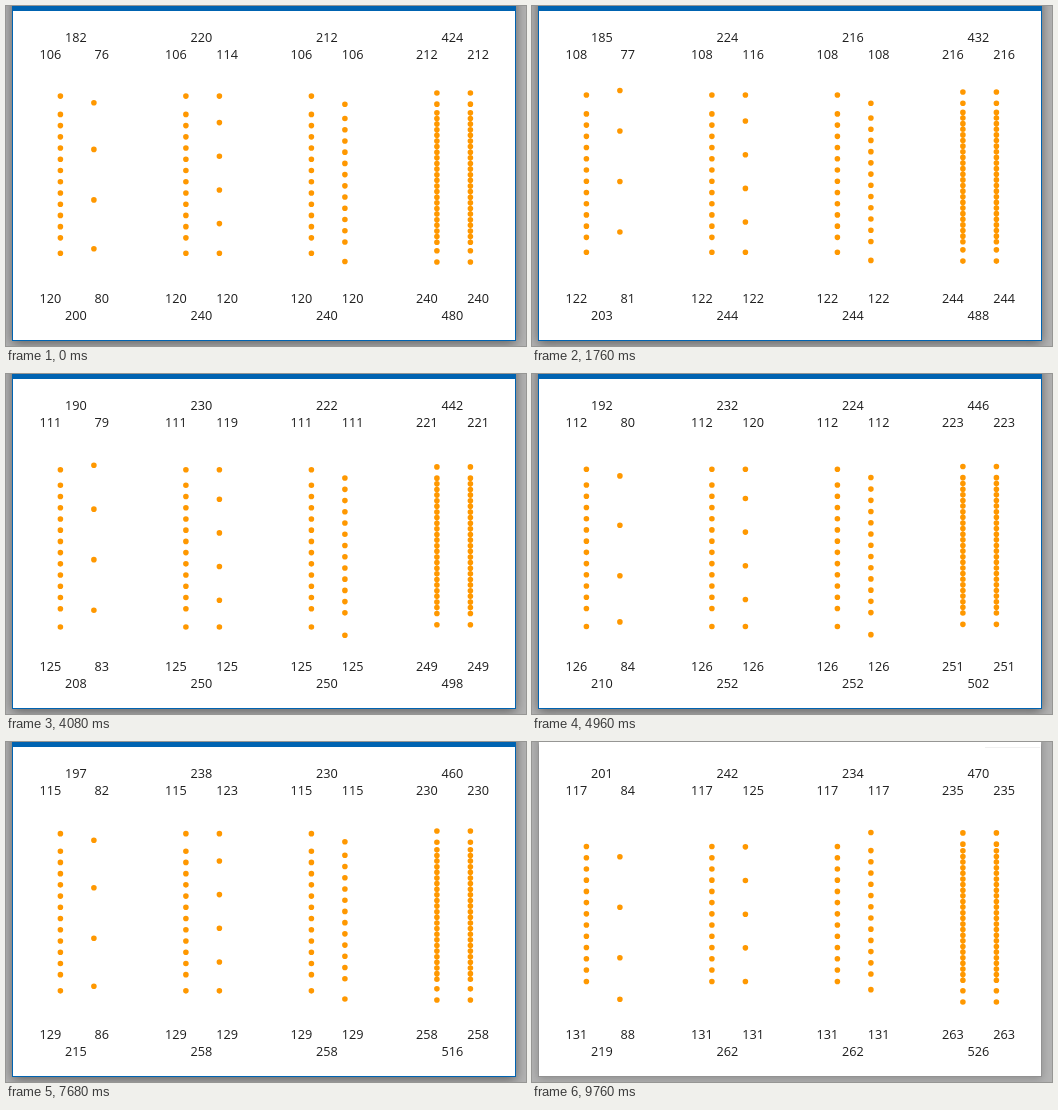
These frames come from a looping animation (520x340 px, 9840 ms). An HTML page:

```html
<!DOCTYPE html>
<html lang="en">
<head>
<meta charset="utf-8">
<title>Throughput and latency</title>
<style>
  html, body { margin: 0; width: 100%; height: 100%; overflow: hidden; background: #b3b3b3; }
  #stage { position: relative; width: 520px; height: 340px; overflow: hidden; }
  #window {
    position: absolute; left: 6px; top: -20px; width: 504px; height: 355px;
    box-sizing: border-box; background: #fff;
    border: 1px solid #0063b1; border-top: 25px solid #0063b1;
    box-shadow: 0 3px 11px rgba(0, 0, 0, .45);
  }
  #window.idle { border-color: #fff #929292 #929292; box-shadow: 0 2px 9px rgba(0, 0, 0, .22); }
  #edge { position: absolute; left: 453px; top: 5px; width: 55px; height: 1px; background: #efefef; display: none; }
  .idle + #edge { display: block; }
  svg { position: absolute; left: 0; top: 0; }
  text { font: 12.7px "Open Sans", "Noto Sans", sans-serif; fill: #1e1e1e; text-anchor: middle; }
  path { stroke: #ff9800; stroke-width: 5.6; stroke-linecap: round; fill: none; }
</style>
</head>
<body>
<div id="stage">
  <div id="window"></div>
  <div id="edge"></div>
  <svg id="view" width="520" height="340" viewBox="0 0 520 340"></svg>
</div>
<script>
const LOOP = 9840, STEP = 80, IDLE_AT = 9680;
const UNIT = 860;
const BOTTOM = 261.5, LOW = 239, HIGH = 104.3, RAMP = 22.4;
const GROUP_GAP = 125.5;

// gap: ms between dots, cross: units spent in the middle section
const slow = { gap: UNIT, phase: 546, cross: 12, sent: 120, flying: 14 };
const late = { ...slow, phase: 232 };
const quick = { ...slow, cross: 4, flying: 6 };
const sparse = { gap: 1.5 * UNIT, phase: 722, cross: 4, sent: 80, flying: 4 };
const dense = { gap: 431, phase: 210, cross: 12, sent: 240, flying: 28 };
const pairs = [[slow, sparse], [slow, quick], [slow, late], [dense, dense]];

const view = document.getElementById('view');
const frame = document.getElementById('window');

function add(tag, attrs = {}) {
  const el = document.createElementNS('http://www.w3.org/2000/svg', tag);
  for (const key in attrs) el.setAttribute(key, attrs[key]);
  return view.appendChild(el);
}

const label = (x, y) => add('text', { x, y });

const groups = pairs.map((pair, i) => {
  const left = i * GROUP_GAP;
  return {
    received: label(left + 70, 35.8),
    sent: label(left + 70, 314),
    lanes: pair.map((flow, j) => ({
      flow,
      x: left + 54.4 + j * 33.5,
      dots: add('path'),
      received: label(left + 44.5 + j * 51.2, 53.4),
      sent: label(left + 44.5 + j * 51.2, 296.6)
    }))
  };
});

// Ramp in, cross the middle, ramp out
function height(age, cross) {
  const u = age / UNIT;
  if (u < 1) return BOTTOM - u * RAMP;
  if (u < 1 + cross) return LOW - (u - 1) / cross * (LOW - HIGH);
  return HIGH - (u - 1 - cross) * RAMP;
}

function drawLane({ flow, x, dots, received, sent }, t) {
  const { gap, phase, cross } = flow;
  const clock = t + phase;
  const end = (cross + 2) * UNIT - 30;
  let d = '';
  for (let age = clock % gap; age < end; age += gap) {
    d += `M${x} ${height(age, cross).toFixed(2)}h0`;
  }
  dots.setAttribute('d', d);
  const out = flow.sent + Math.floor(clock / gap);
  const back = out - flow.flying;
  sent.textContent = out;
  received.textContent = back;
  return [back, out];
}

function draw(t) {
  for (const { received, sent, lanes } of groups) {
    const [a, b] = lanes.map(lane => drawLane(lane, t));
    received.textContent = a[0] + b[0];
    sent.textContent = a[1] + b[1];
  }
  frame.classList.toggle('idle', t >= IDLE_AT);
}

const start = performance.now();
function tick() {
  const t = (performance.now() - start) % LOOP;
  draw(Math.floor(t / STEP) * STEP);
  requestAnimationFrame(tick);
}
tick();
</script>
</body>
</html>
```
